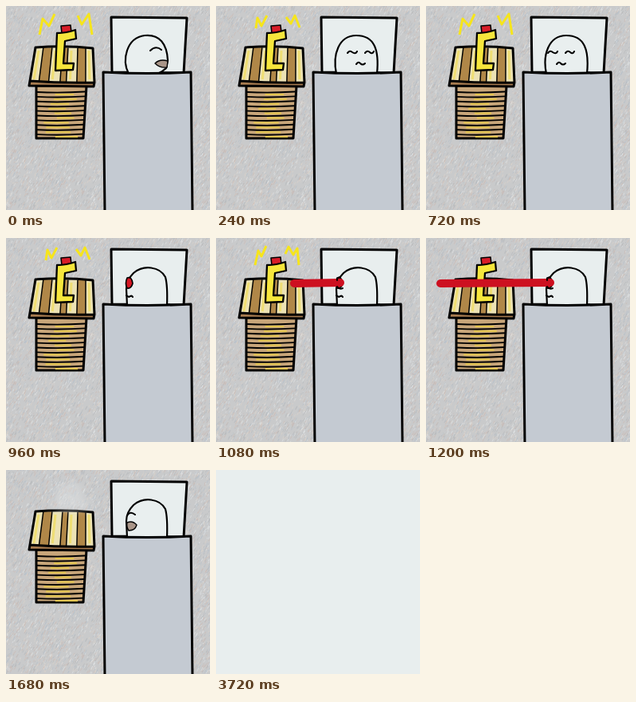
These frames come from a looping animation (256x256 px, 4890 ms). An HTML page:

```html
<!DOCTYPE html>
<html lang="en">
<head>
<meta charset="utf-8">
<title>Alarm clock</title>
<style>
html, body { margin: 0; width: 100%; height: 100%; overflow: hidden; background: #c9cacb; }
svg { display: block; width: 100vw; height: 100vh; }
.ink { stroke: #000; stroke-linecap: round; stroke-linejoin: round; }
</style>
</head>
<body>
<svg id="stage" viewBox="0 0 256 256">
  <defs>
    <filter id="soft" x="-50%" y="-50%" width="200%" height="200%"><feGaussianBlur stdDeviation="5"/></filter>
    <clipPath id="top"><path d="M37 52L109 53L111 96L30 94Z"/></clipPath>
  </defs>
  <g id="wall" fill="none" stroke-width="1"></g>

  <g id="table">
    <path class="ink" d="M38 100L101 100L97 166L38 166Z" fill="#c8a67a" stroke-width="3"/>
    <g id="slats" fill="none"></g>
    <path d="M30 94L111 96L110 101L29 100Z" fill="#a87c50"/>
    <g id="planks" clip-path="url(#top)"></g>
    <path class="ink" d="M37 52Q74 49 109 53L111 96L110 101L29 100L30 94ZM30 94Q70 97 111 96" fill="none" stroke-width="3"/>
  </g>

  <g id="clock">
    <path class="ink" d="M69 25L81 24L82 33L70 34Z" fill="#d81c28" stroke-width="1.6"/>
    <path class="ink" d="M64 34Q76 34 87 30L88 41L74 44L72 72L85 72L84 80L62 81Z" fill="#f6e63c" stroke-width="2.3"/>
  </g>
  <path id="ring" fill="none" stroke="#f6e51c" stroke-width="3" stroke-linejoin="round"/>

  <g id="smoke">
    <g filter="url(#soft)">
      <ellipse cx="69" cy="25" rx="29" ry="24" fill="#c7c1b8" opacity=".75"/>
      <ellipse cx="71" cy="58" rx="38" ry="31" fill="#b79568" opacity=".9"/>
      <ellipse cx="68" cy="41" rx="25" ry="20" fill="#aa8660" opacity=".8"/>
      <ellipse cx="57" cy="69" rx="20" ry="19" fill="#987347" opacity=".6"/>
      <ellipse cx="88" cy="60" rx="16" ry="15" fill="#c48b4c" opacity=".65"/>
      <ellipse cx="72" cy="82" rx="21" ry="14" fill="#856848" opacity=".6"/>
    </g>
  </g>
  <g id="haze" filter="url(#soft)" fill="#dfe2e3">
    <ellipse cx="79" cy="30" rx="18" ry="16" opacity=".65"/>
    <ellipse cx="83" cy="44" rx="25" ry="8" opacity=".65"/>
  </g>

  <path class="ink" d="M132 14L227 15L223 84L133 83Z" fill="#e8eeee" stroke-width="3"/>
  <path id="head" class="ink" fill="#e9efef" stroke-width="2.2"/>
  <path id="mouth" class="ink" fill="#a99588" stroke-width="1.4"/>
  <path id="lines" class="ink" fill="none" stroke-width="2.1"/>
  <path id="eye" class="ink" d="M152 50Q158 48 159 57Q157 64 152 63Q149 57 152 50Z" fill="#d51724" stroke-width="1.7"/>
  <path class="ink" d="M122 83Q178 86 232 83L234 260L124 260Z" fill="#c4cad2" stroke-width="3"/>
  <path id="beam" fill="none" stroke="#cd1020" stroke-width="10" stroke-linecap="round"/>
  <path id="glare" class="ink" d="M156 49Q151 50 152 53M152 61Q155 65 159 63" fill="none" stroke-width="2"/>
  <rect id="blank" width="256" height="256" fill="#e8eeee"/>
</svg>
<script>
const LOOP = 4890;
const $ = id => document.getElementById(id);
const set = (id, d) => $(id).setAttribute('d', d);
const show = (id, alpha) => {
  $(id).style.display = alpha ? '' : 'none';
  $(id).style.opacity = Number(alpha);
};

function add(parent, attrs) {
  const el = document.createElementNS('http://www.w3.org/2000/svg', 'path');
  for (const k in attrs) el.setAttribute(k, attrs[k]);
  $(parent).append(el);
}

let seed = 41;
function rand() {
  seed = (seed * 16807) % 2147483647;
  return seed / 2147483647;
}

// Short slanted flecks on the wall
for (const stroke of ['#b3bfca', '#ded4ca', '#ccb9b0', '#e2e6e7', '#b5b8bb']) {
  let d = '';
  for (let i = 0; i < 1500; i++) {
    const len = 1 + rand() * 4;
    d += `M${(rand() * 256).toFixed(1)} ${(rand() * 256).toFixed(1)}l${(len * .5).toFixed(1)} ${(-len).toFixed(1)}`;
  }
  add('wall', { d, stroke, opacity: .62 });
}

// Table top planks and the slatted front
const edges = [37, 47, 58, 71, 78, 90, 100, 111];
const foot = x => 30 + (x - 37) * 1.11;
edges.slice(0, -1).forEach((x, i) => {
  const next = edges[i + 1];
  add('planks', {
    d: `M${x} 51L${next} 51L${foot(next)} 97L${foot(x)} 97Z`,
    fill: i % 2 ? '#b08748' : '#ece2b4'
  });
  if (i % 2 === 0) add('planks', {
    d: `M${x + 4} 56L${foot(x) + 5} 92`, stroke: '#f2dc50', 'stroke-width': 3, opacity: .65
  });
  if (i) add('planks', { class: 'ink', d: `M${x} 51L${foot(x)} 97`, 'stroke-width': 1.5 });
});
for (let i = 0; i < 10; i++) {
  const y = 108 + i * 5.9;
  const x = 46 + rand() * 18;
  add('slats', { d: `M${x} ${y + 3}l${20 + rand() * 12} 0`, stroke: '#e3c64e', 'stroke-width': 2 });
  add('slats', { class: 'ink', d: `M39 ${y}Q68 ${y + 1.5} ${99 - i * .2} ${y - .5}`, 'stroke-width': 1.9 });
}

const rings = {
  big: 'M42 36L46 16L54 25L61 10M90 12L95 23L104 10L108 36',
  mid: 'M49 34L53 16L57 23L63 10M87 20L91 11L97 21L102 13L104 34',
  low: 'M50 28L52 15L57 25L64 12M88 14L94 22L99 12L105 27'
};
const front = 'M151 85C146 61 154 37 176 37C199 37 205 55 202 85';
const left = 'M152 85L151 64C151 57 154 50 160 44C173 33 193 36 200 49Q203 60 202 85';
const calm = dx => `M${159 + dx} 59q3 -4 6 -1q4 3 6 -1M${181 + dx} 59q3 -4 6 -1q3 3 5 -1M${170 + dx} 73q3 -4 5 -1q3 3 6 0`;
const sneer = 'M151 72q3 3 5 1q2 -1 3 1';

const faces = {
  right: {
    head: 'M154 85C145 68 151 40 174 37C193 35 202 48 203 68L201 78Q197 82 190 85',
    lines: 'M181 56Q188 49 195 55',
    mouth: 'M187 72Q193 66 203 69L202 77Q193 78 187 72Z'
  },
  turnRight: { head: front, lines: calm(6) },
  front: { head: front, lines: calm(0) },
  turnLeft: { head: front, lines: calm(-6) },
  awake: { head: left, lines: sneer },
  asleep: {
    head: left,
    lines: 'M152 57Q156 51 162 56',
    mouth: 'M152 66Q159 63 164 69Q162 76 154 76Q151 72 152 66Z'
  }
};

const poses = [
  { at: 0, face: 'right', ring: 'big' },
  { at: 240, face: 'turnRight', ring: 'low' },
  { at: 480, face: 'front', ring: 'mid' },
  { at: 720, face: 'turnLeft', ring: 'big' },
  { at: 960, face: 'awake', ring: 'low' },
  { at: 1020, face: 'awake', ring: 'low', beam: 138 },
  { at: 1080, face: 'awake', ring: 'mid', beam: 98 },
  { at: 1140, face: 'awake', ring: 'low', beam: 58 },
  { at: 1200, face: 'awake', beam: 18 },
  { at: 1320, face: 'awake', beam: -8, smoke: .6 },
  { at: 1440, face: 'awake', beam: -8, smoke: 1, gone: true },
  { at: 1560, face: 'awake', smoke: .45, gone: true },
  { at: 1680, face: 'asleep', haze: .65, gone: true },
  { at: 3720, face: 'asleep', gone: true, blank: true }
];

function render(t) {
  const p = poses.findLast(q => q.at <= t);
  const face = faces[p.face];
  const firing = p.beam !== undefined;
  set('head', face.head);
  set('lines', face.lines);
  set('mouth', face.mouth || '');
  set('ring', rings[p.ring] || '');
  set('beam', firing ? `M${p.beam} ${p.beam < 0 ? 55 : 57}L156 56` : '');
  show('eye', p.face === 'awake');
  show('glare', firing);
  show('clock', !p.gone);
  show('smoke', p.smoke || 0);
  show('haze', p.haze || 0);
  show('blank', p.blank);
}

const start = performance.now();
function tick() {
  render((performance.now() - start) % LOOP);
  requestAnimationFrame(tick);
}
tick();
</script>
</body>
</html>
```
